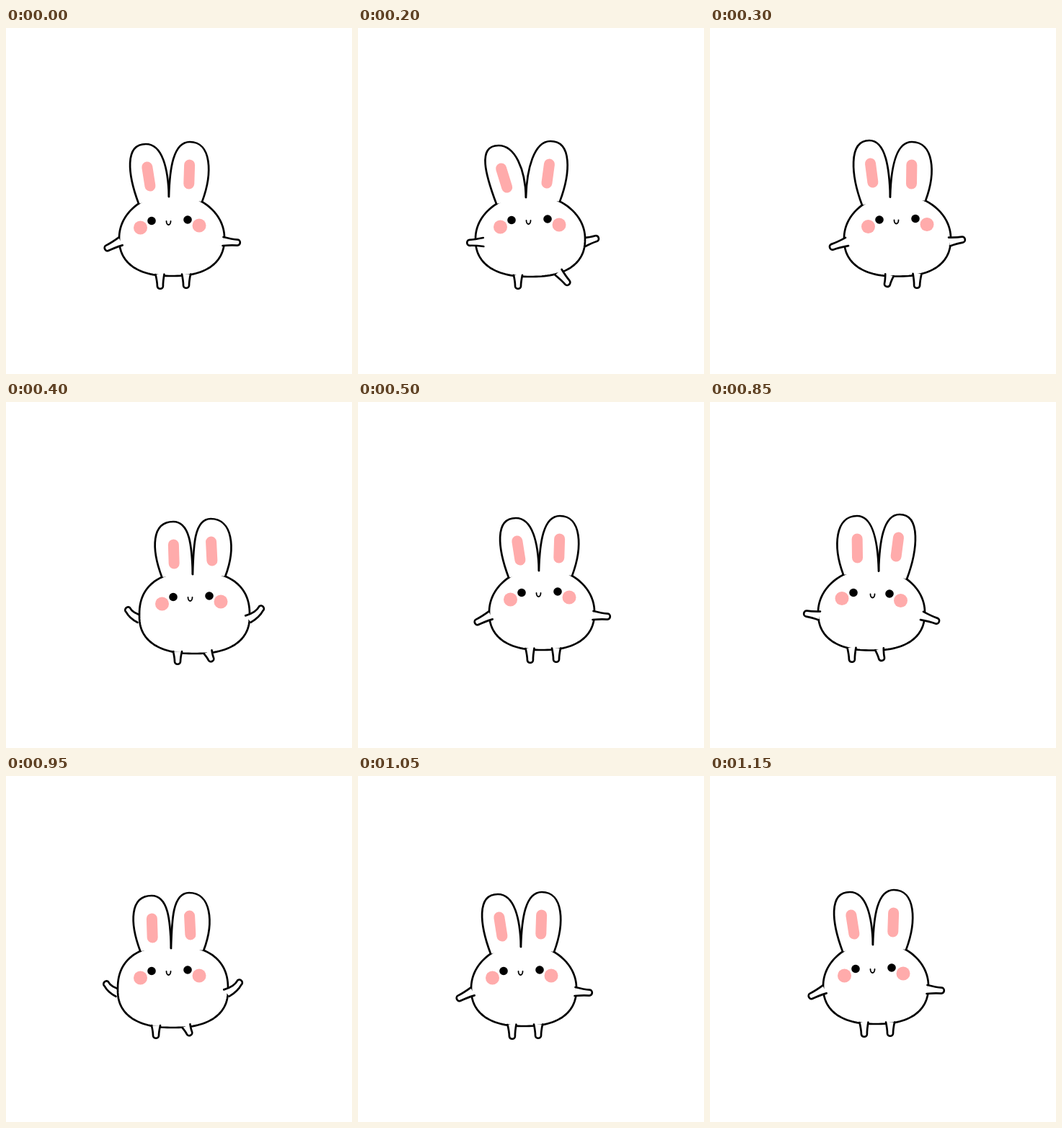
Write an HTML page with a canvas that moves like this. It is 480x480 px and loops after 1250 ms.

```html
<!DOCTYPE html>
<html>
<head>
<meta charset="utf-8">
<style>
html, body { margin: 0; height: 100%; overflow: hidden; background: #fff; }
canvas { display: block; }
</style>
</head>
<body>
<canvas id="stage" width="480" height="480"></canvas>
<script>
const ctx = document.getElementById('stage').getContext('2d');
const PINK = '#ffabab', INK = '#000', PAPER = '#fff';
const TOP = 61, BOTTOM = 53, SIDES = [-1, 1];

// body: centre and half width; crease: x where the ears meet; every pair is left, right.
// reach: how far each arm overlaps the body (negative: it starts behind the body).
const stand = {
  body: [230, 291, 73], crease: 226, tips: [[194, 161], [255, 158]],
  hands: [[137, 307], [325, 298]], reach: [2, 2],
  hips: [213.5, 250], feet: [[214, 362], [250, 361]], face: [225.5, 270]
};
const stride = {
  body: [239, 292, 76], crease: 233, tips: [[195, 163], [267, 157]],
  hands: [[151, 298], [334, 291]], reach: [11, -1],
  hips: [222, 278], feet: [[222, 362], [293, 356]], face: [236.5, 269]
};
const sway = {
  body: [260, 291.5, 74], crease: 250, tips: [[221, 156], [280, 158]],
  hands: [[166, 305], [354, 293]], reach: [4, 2],
  hips: [249, 287.5], feet: [[245, 359], [287, 361]], face: [258.5, 268.5]
};
const turn = {
  body: [254.5, 293, 72], crease: 256, tips: [[231, 161], [290, 163]],
  hands: [[162, 291], [340, 296]], reach: [-1, 10],
  hips: [211, 268], feet: [[209, 357], [268, 362]], face: [237.5, 268]
};
const squash = {
  body: [231.5, 296, 76.5], crease: 229, tips: [[202, 166], [254, 162]],
  hands: [[136, 286], [327, 284]], reach: [-1, 2], sag: 4, boxy: 2.4,
  hips: [208, 250], feet: [[208, 364], [256, 360]], face: [225.5, 273]
};

const LOOP = 1250;
const steps = [
  { at: 0, pose: stand },
  { at: 100, pose: stride, dx: -5 },
  { at: 200, pose: stride },
  { at: 300, pose: sway },
  { at: 400, pose: squash, dx: 30 },
  { at: 500, pose: stand, dx: 25, faceDy: -3 },
  { at: 750, pose: turn },
  { at: 850, pose: sway, dx: 484, flip: -1 },
  { at: 950, pose: squash },
  { at: 1050, pose: stand, dy: 3 },
  { at: 1150, pose: stand }
];

function paint() {
  ctx.fillStyle = PAPER;
  ctx.fill();
  ctx.lineWidth = 2.7;
  ctx.stroke();
}

// Height of the body's edge at x; side -1 is the top, 1 the bottom.
function edge({ body: [cx, cy, rx], boxy = 2 }, x, side) {
  const n = side < 0 ? boxy : 2.4;
  const rise = (1 - Math.min(1, Math.abs((x - cx) / rx)) ** n) ** (1 / n);
  return cy + side * rise * (side < 0 ? TOP : BOTTOM);
}

function drawBody(pose) {
  const [cx, , rx] = pose.body;
  ctx.beginPath();
  for (let i = 0; i < 120; i++) {
    const a = i * Math.PI / 60, x = cx + rx * Math.cos(a);
    ctx.lineTo(x, edge(pose, x, i < 60 ? 1 : -1));
  }
  ctx.closePath();
  paint();
}

// Tapered limb, left open where it joins the body.
function limb(x, y, [tipX, tipY], bend = 0) {
  const length = Math.hypot(tipX - x, tipY - y), wrist = length - 4;
  ctx.save();
  ctx.translate(x, y);
  ctx.rotate(Math.atan2(tipY - y, tipX - x));
  ctx.beginPath();
  ctx.moveTo(0, -6);
  ctx.quadraticCurveTo(length / 2, -4 + bend, wrist, -4);
  ctx.bezierCurveTo(length + 1, -4, length + 1, 4, wrist, 4);
  ctx.quadraticCurveTo(length / 2, 4 + bend, 0, 6);
  paint();
  ctx.restore();
}

function drawArms({ body: [cx, cy, rx], hands, reach, sag = 0 }, behind) {
  SIDES.forEach((side, i) => {
    if (reach[i] < 0 === behind)
      limb(cx + side * (rx - Math.abs(reach[i])), cy + 5, hands[i], side * sag);
  });
}

function drawEar(pose, side, [tx, ty]) {
  const { body: [cx, cy], crease } = pose;
  const baseX = (crease + cx) / 2 + side * 44, baseY = edge(pose, baseX, -1);
  const creaseY = cy - 57;
  ctx.beginPath();
  ctx.moveTo(baseX, baseY);
  ctx.bezierCurveTo(baseX + side * 15, baseY - 40, tx + side * 30, ty, tx, ty);
  ctx.bezierCurveTo(tx - side * 23, ty, crease + side, creaseY - 39, crease, creaseY);
  paint();

  const lean = baseX + (crease - baseX) * 0.4 - tx;
  const x = tx + lean * 0.57, y = ty + 45;
  ctx.beginPath();
  ctx.moveTo(x - lean * 0.3, y - 13);
  ctx.lineTo(x + lean * 0.3, y + 13);
  ctx.strokeStyle = PINK;
  ctx.lineWidth = 15;
  ctx.stroke();
  ctx.strokeStyle = INK;
}

function dot(x, y, r, color) {
  ctx.beginPath();
  ctx.arc(x, y, r, 0, 2 * Math.PI);
  ctx.fillStyle = color;
  ctx.fill();
}

function drawFace(x, y) {
  dot(x - 39, y + 7, 9.5, PINK);
  dot(x + 42.5, y + 4, 9.5, PINK);
  dot(x - 23.5, y - 2.5, 5.8, INK);
  dot(x + 26.5, y - 4, 5.8, INK);
  ctx.beginPath();
  ctx.ellipse(x, y - 2, 3, 5, 0, 0, Math.PI);
  ctx.lineWidth = 1.8;
  ctx.stroke();
}

function drawRabbit(pose, faceDy) {
  drawArms(pose, true);
  drawBody(pose);
  drawArms(pose, false);
  pose.hips.forEach((x, i) => limb(x, edge(pose, x, 1) - 1.5, pose.feet[i]));
  SIDES.forEach((side, i) => drawEar(pose, side, pose.tips[i]));
  drawFace(pose.face[0], pose.face[1] + faceDy);
}

function render(time) {
  const t = time % LOOP;
  const { pose, dx = 0, dy = 0, flip = 1, faceDy = 0 } = steps.findLast(s => s.at <= t);
  ctx.setTransform(1, 0, 0, 1, 0, 0);
  ctx.fillStyle = PAPER;
  ctx.fillRect(0, 0, 480, 480);
  ctx.setTransform(flip, 0, 0, 1, dx, dy);
  ctx.strokeStyle = INK;
  ctx.lineCap = ctx.lineJoin = 'round';
  drawRabbit(pose, faceDy);
}

const start = performance.now();
function tick() {
  render(performance.now() - start);
  requestAnimationFrame(tick);
}
tick();
</script>
</body>
</html>
```
